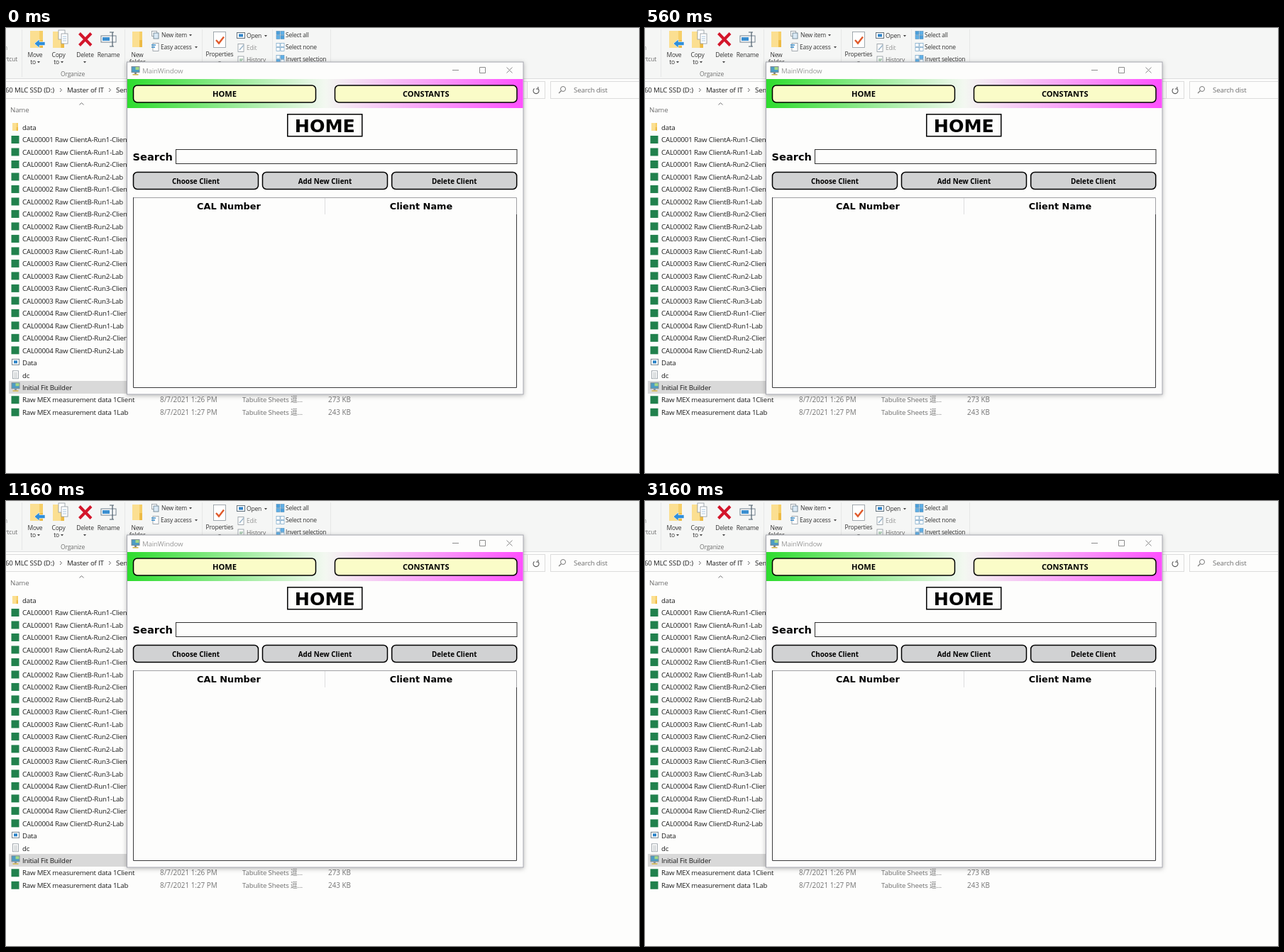
These frames come from a looping animation (892x628 px, 8000 ms). An HTML page:

```html
<!DOCTYPE html>
<html lang="en">
<head>
<meta charset="utf-8">
<title>Client list</title>
<style>
  html, body { margin: 0; width: 100%; height: 100%; overflow: hidden; background: #fdfdfc; }
  svg { display: block; }
  text { font: 9.7px "Open Sans", "Noto Sans", "Noto Sans CJK SC", sans-serif; letter-spacing: -.17px; fill: #1c1c1c; white-space: pre; }
  .rib { font-size: 8.5px; letter-spacing: -.2px; fill: #333; }
  .dim { fill: #6f6f6f; }
  .pale { fill: #999; }
  .cell { font-size: 9.9px; letter-spacing: 0; fill: #747474; }
  .mid { text-anchor: middle; }
  .end { text-anchor: end; }
  .bold { font: bold 12.9px "DejaVu Sans", sans-serif; letter-spacing: 0; fill: #000; }
  .h1 { font-size: 25.3px; }
  .h2 { font-size: 14.6px; }
  .btn { font: bold 9.9px "Open Sans", sans-serif; letter-spacing: 0; fill: #000; }
  .nav { font-size: 11.1px; }
</style>
</head>
<body>
<svg id="stage" width="892" height="628" viewBox="0 0 892 628"></svg>
<script>
const text = (x, y, s, cls = '') => `<text x="${x}" y="${y}" class="${cls}">${s}</text>`;
const rect = (x, y, w, h, fill, stroke = 'none', more = '') =>
  `<rect x="${x}" y="${y}" width="${w}" height="${h}" fill="${fill}" stroke="${stroke}" ${more}/>`;
const path = (d, stroke, width = 1, fill = 'none') =>
  `<path d="${d}" stroke="${stroke}" stroke-width="${width}" fill="${fill}"/>`;
const at = (x, y, s) => `<g transform="translate(${x} ${y})">${s}</g>`;
const caret = (x, y) => path(`M${x - 2} ${y - 1}h4l-2 2.4z`, 'none', 0, '#444');

const folder = (x, y, w, h) =>
  rect(x, y, w, h, '#f6cf68') + rect(x, y, w * .72, h, '#fbdf91') + rect(x + w * .72, y + h * .55, w * .28, h * .45, '#edbb45');
const sheet = (x, y, w, h) => rect(x, y, w, h, '#fff', '#8d969d', 'stroke-width=".8"');
const monitor =
  rect(.5, .5, 11, 8, '#4d9cc4', '#7d8b94') + rect(6, 1, 5, 4, '#a5d884') +
  rect(4.5, 9, 3, 2, '#7d8b94') + rect(2, 11, 8, 1.6, '#d8b94e');
const table = (x, y, a, b) => [0, 1, 2, 3].map(i =>
  rect(x + (i % 2) * 6, y + (i >> 1) * 6, 5, 5, i % 3 ? a : b, '#5b93bd', 'stroke-width=".6"')).join('');

function ribbon() {
  const sep = [22, 167, 276, 375, 457].map(x => path(`M${x}.5 2V69`, '#e6e7e7')).join('');
  return rect(0, 0, 892, 71, '#f5f6f5') + sep + path('M0 71.5H892', '#dcdddd') +
    text(2, 31, 'Copy path', 'rib end pale') + text(16, 47, 'Paste shortcut', 'rib end dim') +
    folder(34, 4, 18, 24) + path('M40 22l7-6v3.5h8v5h-8v3.5z', '#fff', .6, '#2f8fdb') +
    folder(66, 5, 16, 23) + sheet(74, 3, 9, 13) + sheet(78, 8, 9, 14) +
    path('M80 12h5M80 15h5M80 18h5', '#8fb3d2', .8) +
    path('M103.5 7.5L120 24.5M120 7.5L103.5 24.5', '#d3162b', 4) +
    rect(134, 11, 21, 9, '#fff', '#70808c') + rect(136, 13, 10, 5, '#3b8fd0') +
    path('M146 6h3.5M152 6h-2.5M150 6V26M146 26h3.5M152 26h-2.5', '#4b5d6b', 1.2) +
    text(41, 41, 'Move', 'rib mid') + text(38, 51, 'to', 'rib mid') + caret(46, 48) +
    text(74, 41, 'Copy', 'rib mid') + text(71, 51, 'to', 'rib mid') + caret(79, 48) +
    text(111.5, 41, 'Delete', 'rib mid') + caret(111, 48) +
    text(144.5, 41, 'Rename', 'rib mid') + text(94, 67.5, 'Organize', 'rib mid dim') +
    folder(178, 5, 14, 22) + text(185, 41, 'New', 'rib mid') + text(185, 51, 'folder', 'rib mid') +
    sheet(205.5, 4.5, 7, 7) + rect(208, 7, 7, 8, '#d9e9f5', '#5f7888', 'stroke-width=".8"') +
    text(219, 13, 'New item', 'rib') + caret(260, 10) +
    sheet(207, 21.5, 8, 11) + path('M205 24h6M205 27h5', '#3589c7', 1.4) +
    text(218, 30, 'Easy access', 'rib') + caret(268, 27) +
    sheet(292.5, 5.5, 17, 22) + path('M296 17l4 4.5l7-9', '#e05a2b', 2.4) +
    text(301, 40, 'Properties', 'rib mid') + caret(301, 48) +
    rect(325.5, 6.5, 11, 8, '#fff', '#63727d') + rect(328, 8.5, 6, 4, '#3184c8') +
    text(339, 14, 'Open', 'rib') + caret(366, 11) +
    sheet(327, 22.5, 8, 11) + path('M329 31l6-7', '#9cb6ca', 1.5) + text(339, 31, 'Edit', 'rib pale') +
    sheet(327, 40, 8, 10) + path('M329 44h5M329 46h4', '#6da279') + text(339, 48, 'History', 'rib dim') +
    table(381, 4.5, '#5eb0e8', '#4a9fdb') + text(394, 13, 'Select all', 'rib') +
    table(381, 21.5, '#fff', '#fff') + text(394, 30, 'Select none', 'rib') +
    table(381, 38.5, '#5eb0e8', '#f4fafd') + text(394, 46.5, 'Invert selection', 'rib');
}

function addressBar() {
  return rect(-2, 75.5, 761.5, 24, '#fdfdfc', '#dcdcdc') + path('M734.5 76V99', '#dcdcdc') +
    rect(767.5, 75.5, 130, 24, '#fdfdfc', '#dcdcdc') +
    text(-1, 91, '60 MLC SSD (D:)') + text(86, 91, 'Master of IT') + text(155, 91, 'Seminar') +
    path('M76 85l2.5 2.5l-2.5 2.5M145 85l2.5 2.5l-2.5 2.5', '#666') +
    path('M749.5 85.5a4 4 0 1 1-5 0M749.8 83v3h-3', '#555', 1.1) +
    '<circle cx="785" cy="86" r="3.5" fill="none" stroke="#777"/>' + path('M782.5 88.5l-3.5 3.5', '#777', 1.1) +
    text(800, 91, 'Search dist', 'dim') +
    path('M103.5 108.5l3-3l3 3', '#777') + text(6, 119, 'Name', 'dim');
}

function fileList() {
  const green = y => rect(7.5, y - 5.5, 11, 11, '#21814d');
  const rows = [['data', y => folder(9, y - 6, 8, 11)]];
  [2, 2, 3, 2].forEach((runs, c) => {
    for (let run = 1; run <= runs; run++)
      for (const who of ['Client', 'Lab'])
        rows.push([`CAL0000${c + 1} Raw Client${'ABCD'[c]}-Run${run}-${who}`, green]);
  });
  rows.push(
    ['Data', y => rect(8.5, y - 5, 10, 8, '#fff', '#71818c') + rect(11, y - 3, 5, 4, '#2b83c8')],
    ['dc', y => sheet(9.5, y - 6, 8, 11) + path(`M11 ${y - 3}h5m-5 2h5m-5 2h5m-5 2h5`, '#aab0b4', .8)],
    ['Initial Fit Builder', y => at(7.5, y - 7, monitor)],
    ['Raw MEX measurement data 1Client', green, '8/7/2021 1:26 PM', '273 KB'],
    ['Raw MEX measurement data 1Lab', green, '8/7/2021 1:27 PM', '243 KB']);
  return rect(4, 498, 480, 18, '#d9d9d9') + rows.map(([name, icon, date, size], i) => {
    const y = 140 + i * 17.49, base = y + 3.7;
    const details = date
      ? text(217, base, date, 'cell') + text(333, base, 'Tabulite Sheets 逗...', 'dim') + text(454, base, size, 'cell')
      : '';
    return icon(y) + text(23, base, name) + details;
  }).join('');
}

function appWindow() {
  const button = (x, y, w, fill, label, cls) =>
    rect(x, y, w, 24, fill, '#000', 'rx="5.5" stroke-width="1.5"') +
    text(x + w / 2, y + 16, label, 'btn mid ' + cls);
  const grey = (x, label) => button(x, 203.5, 176, '#d1d2d3', label, '');
  return rect(170.5, 48, 558.5, 469, '#fdfdfc', '#a2a3ac', 'filter="url(#shade)"') +
    at(176.5, 54, monitor) + text(192, 63.5, 'MainWindow', 'pale') +
    path('M629 59.5h9M667.5 55.5h8v8h-8zM705.5 55.5l8 8m0-8l-8 8', '#8c8c8c') +
    rect(171, 72, 557.5, 41, 'url(#band)') +
    button(179.5, 81, 257, '#fafcc8', 'HOME', 'nav') +
    button(463.5, 81, 256.5, '#fafcc8', 'CONSTANTS', 'nav') +
    rect(396.8, 121.8, 105, 31, '#fdfdfc', '#000', 'stroke-width="1.5"') +
    text(449.3, 147.2, 'HOME', 'bold h1 mid') +
    text(178.5, 186.7, 'Search', 'bold h2') + rect(239.5, 171.5, 480.5, 20, '#fdfdfc', '#333') +
    grey(179.5, 'Choose Client') + grey(361.5, 'Add New Client') + grey(543.7, 'Delete Client') +
    path('M719.5 263V239.5H179.5', '#a0a0a4') + path('M449.5 240V263', '#dedee0') +
    path('M179.5 239V507.5H719.5V263', '#3a3a3c') +
    text(314, 256, 'CAL Number', 'bold mid') + text(585, 256, 'Client Name', 'bold mid');
}

const defs = `<defs>
  <linearGradient id="band">
    <stop offset="0" stop-color="#2edc2e"/><stop offset=".5" stop-color="#f3f8f1"/><stop offset="1" stop-color="#ff50ff"/>
  </linearGradient>
  <filter id="shade" x="-5%" y="-5%" width="110%" height="110%">
    <feDropShadow dx="0" dy="1.5" stdDeviation="3" flood-opacity=".28"/>
  </filter>
</defs>`;

// The screen holds still for the whole loop.
document.getElementById('stage').innerHTML = defs + ribbon() + addressBar() + fileList() + appWindow();
</script>
</body>
</html>
```
